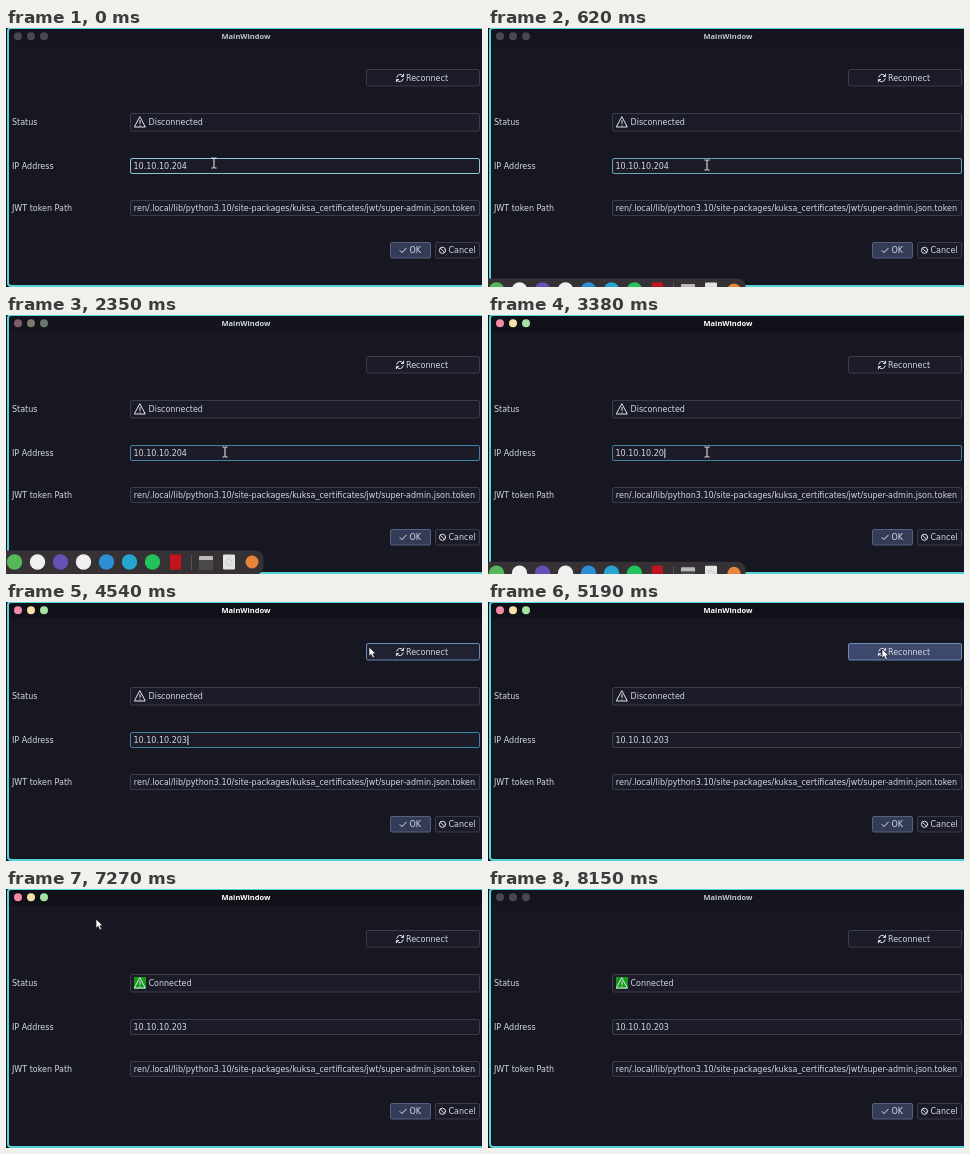
Recreate the animation shown at these times as an HTML page. Size 476x259 px, loop 8.38 s.

```html
<!DOCTYPE html>
<html lang="en">
<head>
<meta charset="utf-8">
<title>MainWindow</title>
<style>
html, body { margin: 0; width: 100%; height: 100%; overflow: hidden; background: #0b0b11; }
svg { display: block; width: 476px; height: 259px; }
text { font: 8px "DejaVu Sans", sans-serif; fill: #d3d7e2; white-space: pre; }
#title { font: bold 7.5px "Noto Sans", sans-serif; text-anchor: middle; }
.box { fill: #1c1c29; stroke: #3a3b4c; }
.icon { fill: none; stroke: #e2e5ee; stroke-width: 1; stroke-linecap: round; stroke-linejoin: round; }
</style>
</head>
<body>
<svg viewBox="0 0 476 259">
  <defs>
    <clipPath id="pathClip"><rect x="126" y="173" width="346" height="15"/></clipPath>
  </defs>
  <rect x="2" y="0" width="490" height="258" rx="3" fill="#171721"/>
  <rect id="bar" x="3" y="1" width="473" height="15.5"/>
  <rect x="2" y="0" width="490" height="258" rx="3" fill="none" stroke="#56d3d8" stroke-width="2"/>
  <g id="lights"></g>
  <text id="title" x="240" y="11">MainWindow</text>

  <rect id="reconnect" class="box" x="360.5" y="41.5" width="113" height="16.5" rx="1.5"/>
  <g class="icon">
    <path d="M390.8 49.2a3.5 3.5 0 0 1 6.4-1.2M397.6 46.2v2.2h-2.3M397.2 50.8a3.5 3.5 0 0 1-6.4 1.2M390.4 53.8v-2.2h2.3"/>
  </g>
  <text x="400" y="53">Reconnect</text>

  <text x="6" y="97">Status</text>
  <rect class="box" x="124.5" y="85.5" width="349" height="17.5" rx="1.5"/>
  <rect id="okBack" x="128" y="88" width="12" height="12" fill="#159a1b"/>
  <path class="icon" d="M134 89L139.3 99H128.7Z" stroke-width="1.3"/>
  <path class="icon" d="M134 92.5v3M134 97.3v.1"/>
  <text id="status" x="142.5" y="97"></text>

  <text x="6" y="141">IP Address</text>
  <rect id="ipBox" class="box" x="124.5" y="130.5" width="349" height="15" rx="1.5"/>
  <text id="ip" x="127.5" y="141"></text>
  <rect id="caret" y="133.5" width="1" height="9.5" fill="#dfe3ee"/>

  <text x="6" y="183">JWT token Path</text>
  <rect class="box" x="124.5" y="172.5" width="349" height="15" rx="1.5"/>
  <g clip-path="url(#pathClip)">
    <text x="469" y="183" text-anchor="end">ren/.local/lib/python3.10/site-packages/kuksa_certificates/jwt/super-admin.json.token</text>
  </g>

  <rect x="384.5" y="214.5" width="40" height="15.5" rx="1.5" fill="#333b57" stroke="#56617f"/>
  <path class="icon" d="M394 222.6l2 2 4.2-4.4"/>
  <text x="403.5" y="225">OK</text>
  <rect class="box" x="429.5" y="214.5" width="44" height="15.5" rx="1.5"/>
  <circle class="icon" cx="436.5" cy="222.3" r="3.1"/>
  <path class="icon" d="M434.4 220.2l4.2 4.2"/>
  <text x="442.5" y="225">Cancel</text>

  <g id="dock">
    <rect x="-12" y="235.5" width="269.5" height="24" rx="8" fill="#353134"/>
    <g id="apps"></g>
    <path d="M185.5 240v15" stroke="#575255"/>
    <rect x="193" y="241" width="14" height="7" rx="1" fill="#b9b9bb"/>
    <rect x="193" y="245" width="14" height="10" rx="1" fill="#4a494c"/>
    <rect x="217" y="239.5" width="12" height="15" rx="1" fill="#e4e4e2"/>
    <circle cx="223" cy="247" r="3" fill="none" stroke="#aaa" stroke-dasharray="1 1"/>
  </g>

  <path id="beam" d="M-2.5-5h2l.5.5.5-.5h2M0-4.5v9M-2.5 5h2l.5-.5.5.5h2" fill="none" stroke="#f2f2f5"/>
  <path id="arrow" d="M0 0V9.2L2.2 7.3 3.8 10.9 5.6 10.1 4 6.7H6.9Z" fill="#fff" stroke="#14141a" stroke-width=".7"/>
</svg>
<script>
const LOOP = 8380;
const NS = 'http://www.w3.org/2000/svg';
const el = id => document.getElementById(id);
const clamp = v => Math.min(1, Math.max(0, v));
const ramp = (t, from, to) => clamp((t - from) / (to - from));
const smooth = v => v * v * (3 - 2 * v);
const within = (t, from, to) => t >= from && t < to;

function add(parent, tag, attrs) {
  const node = document.createElementNS(NS, tag);
  set(node, attrs);
  return parent.appendChild(node);
}
function set(node, attrs) {
  for (const key in attrs) node.setAttribute(key, attrs[key]);
}
function show(node, on) {
  node.style.display = on ? '' : 'none';
}
function mix(a, b, k) {
  const part = (hex, i) => parseInt(hex.slice(1 + 2 * i, 3 + 2 * i), 16);
  return 'rgb(' + [0, 1, 2].map(i => Math.round(part(a, i) + (part(b, i) - part(a, i)) * k)) + ')';
}

const lightColors = ['#f38ba8', '#f7e0a8', '#a6e3a1'];
const lights = lightColors.map((_, i) => add(el('lights'), 'circle', { cx: 12 + 13 * i, cy: 8.3, r: 4 }));

const appColors = ['#55b85a', '#f0f0f0', '#6650b8', '#f0f0f0', '#2e8fd8', '#25a5cf', '#22c25c', '#c4141d'];
appColors.forEach((fill, i) => {
  const x = 8.5 + 23 * i;
  if (i === 7) add(el('apps'), 'rect', { x: x - 5.5, y: 239.5, width: 11, height: 15, fill });
  else add(el('apps'), 'circle', { cx: x, cy: 247, r: 7.7, fill });
});
add(el('apps'), 'circle', { cx: 246, cy: 247, r: 6.5, fill: '#e8853a' });

// Pointer moves: start, end, then start point, bend and end point
const moves = [
  [0, 310, [208, 135], [214, 135], [219, 137]],
  [4080, 4540, [219, 137], [290, 85], [363, 45]],
  [4540, 4880, [363, 45], [380, 44], [394, 47]],
  [5770, 6190, [394, 47], [320, 125], [271, 52]],
  [6460, 6650, [271, 52], [215, 130], [166, 72]],
  [6880, 7120, [166, 72], [130, 48], [90, 30]],
  [7270, 7810, [90, 30], [55, 72], [38, -13]]
];
function pointer(t) {
  const [from, to, a, b, c] = moves.filter(m => t >= m[0]).pop();
  const k = from === 0 ? ramp(t, 40, to) : ramp(t, from, to);
  const u = from === 4080 ? k : smooth(k);
  return a.map((v, i) => v * (1 - u) ** 2 + 2 * b[i] * u * (1 - u) + c[i] * u * u);
}

const caretTimes = [[1500, 1960], [2380, 2920], [3310, 4080], [4540, 4920]];

function draw(t) {
  const active = t < 8150 ? smooth(ramp(t, 2310, 2420)) : 0;
  set(el('bar'), { fill: mix('#15151f', '#11111a', active) });
  el('title').style.fill = mix('#bfc3ce', '#ffffff', active);
  lights.forEach((node, i) => set(node, { fill: mix('#484851', lightColors[i], active) }));

  const connected = t >= 5350;
  show(el('okBack'), connected);
  el('status').textContent = connected ? 'Connected' : 'Disconnected';

  el('ip').textContent = '10.10.10.20' + (t < 3350 ? '4' : t < 3420 ? '' : '3');
  const focus = 1 - ramp(t, 4900, 5040);
  const glow = mix('#8fc3d6', '#3f83a5', ramp(t, 540, 700));
  el('ipBox').style.stroke = focus === 1 ? glow : mix('#3a3b4c', '#3f83a5', focus);
  show(el('caret'), caretTimes.some(([a, b]) => within(t, a, b)));
  set(el('caret'), { x: 128 + el('ip').getComputedTextLength() });

  const hover = ramp(t, 4490, 4540) * (1 - ramp(t, 5830, 5990));
  const press = ramp(t, 4890, 5040) * (1 - ramp(t, 5290, 5380));
  el('reconnect').style.fill = mix('#1c1c29', '#3d496c', Math.max(press, hover * 0.12));
  el('reconnect').style.stroke = mix('#3a3b4c', '#6c89b8', hover);

  const raised = t < 3290 ? 1 - (1 - ramp(t, 500, 1000)) ** 2 : 1 - ramp(t, 3290, 3500);
  set(el('dock'), { transform: `translate(0 ${26 * (1 - raised)})` });

  const [x, y] = pointer(t);
  const typing = y > 130;
  show(el('beam'), typing);
  show(el('arrow'), !typing && t < 7810);
  set(el(typing ? 'beam' : 'arrow'), { transform: `translate(${x} ${y})` });
}

const start = performance.now();
function tick() {
  draw((performance.now() - start) % LOOP);
  requestAnimationFrame(tick);
}
tick();
</script>
</body>
</html>
```
